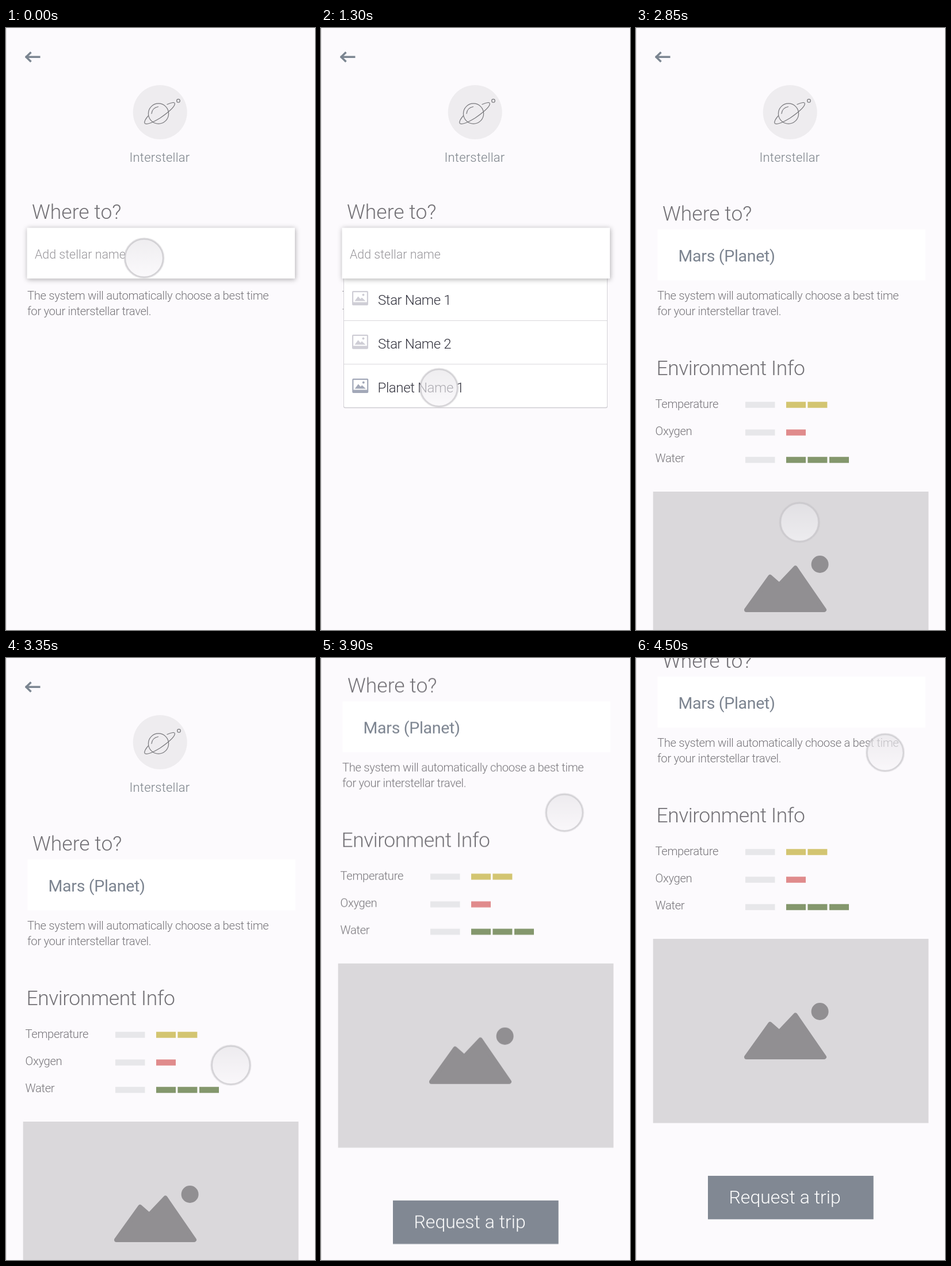
These frames come from a looping animation (537 px wide and 1044 px high, 5.05 s). An HTML page:

```html
<!DOCTYPE html>
<html lang="en">
<head>
<meta charset="utf-8">
<title>Trip form</title>
<style>
html, body { margin: 0; width: 100%; height: 100%; overflow: hidden; background: #fcfafd; }
svg { display: block; width: 537px; height: 1044px; }
text { font-family: Roboto, "Liberation Sans", sans-serif; font-weight: 300; fill: #77757a; }

.title { font-size: 35.5px; fill: #737176; }
.env { letter-spacing: -.5px; }
.body { font-size: 20.3px; letter-spacing: -.35px; }
.brand { font-size: 22px; letter-spacing: .2px; fill: #7b8289; }
.hint { font-size: 21.4px; fill: #98969b; }
.value { font-size: 28.5px; font-weight: 400; letter-spacing: -.3px; fill: #7c8490; }
.option { font-size: 24px; letter-spacing: -.4px; fill: #34343f; }
.button { font-size: 32px; fill: #fff; }
.line { fill: none; stroke: #77777b; stroke-width: 1.2; stroke-linecap: round; }
.arrow { fill: none; stroke: #7b8591; stroke-width: 3.5; }
.shadow { filter: blur(4px); }

.page, .list, .before, .after, .field, .heading, .shadow, .barb, .moon, .cx, .cy, .press {
  animation: 5.05s linear infinite;
}
.page { animation-name: scroll; }
.list { animation-name: list; }
.before { animation-name: before; }
.after { animation-name: after; }
.field, .heading { animation-name: settle; }
.shadow { animation-name: flatten; }
.barb { animation-name: barb; }
.moon { animation-name: moon; }
.cx { animation-name: cx; }
.cy { animation-name: cy; }
.press { animation-name: press; }

@keyframes scroll {
  0%, 69.31% { transform: translateY(0); animation-timing-function: cubic-bezier(.35, .08, .6, .81); }
  77.23% { transform: translateY(-274px); animation-timing-function: cubic-bezier(.1, .45, .3, 1); }
  89.11%, 100% { transform: translateY(-317px); }
}
@keyframes list {
  0%, .2% { opacity: 0; animation-timing-function: ease-out; }
  5.94%, 36.59% { opacity: 1; }
  36.6%, 100% { opacity: 0; }
}
@keyframes before {
  0%, 36.59% { opacity: 1; }
  36.6%, 100% { opacity: 0; }
}
@keyframes after {
  0%, 36.59% { opacity: 0; }
  36.6%, 100% { opacity: 1; }
}
@keyframes settle {
  0%, 36.64% { transform: translate(0, 0); animation-timing-function: ease-in-out; }
  45.54%, 100% { transform: translate(1px, 3px); }
}
@keyframes flatten {
  0%, 36.64% { opacity: 1; animation-timing-function: ease-in-out; }
  45.54%, 100% { opacity: 0; }
}
@keyframes barb {
  0%, 36.59% { transform: translateY(0); }
  36.6%, 36.64% { transform: translateY(-8px); animation-timing-function: ease-in-out; }
  45.54%, 100% { transform: translateY(0); }
}
@keyframes moon {
  0%, 36.64% { transform: translateX(0); }
  45.54%, 100% { transform: translateX(1px); }
}
@keyframes cx {
  0%, 12.18% { transform: translateX(240px); animation-timing-function: ease; }
  22.77%, 46.53% { transform: translateX(205px); animation-timing-function: cubic-bezier(.4, 0, .8, .62); }
  56.44% { transform: translateX(284px); animation-timing-function: cubic-bezier(.3, .5, .6, 1); }
  68.32%, 71.88% { transform: translateX(394px); animation-timing-function: cubic-bezier(.4, 0, .7, .8); }
  77.23% { transform: translateX(423px); animation-timing-function: cubic-bezier(.1, .57, .3, 1); }
  89.11%, 100% { transform: translateX(433px); }
}
@keyframes cy {
  0%, 12.18% { transform: translateY(399px); animation-timing-function: ease; }
  22.77%, 46.53% { transform: translateY(624px); animation-timing-function: cubic-bezier(.4, 0, .6, .9); }
  56.44% { transform: translateY(857px); animation-timing-function: cubic-bezier(.3, .25, .6, 1); }
  59.41% { transform: translateY(883px); animation-timing-function: ease-in-out; }
  68.32%, 71.88% { transform: translateY(686.5px); animation-timing-function: cubic-bezier(.4, 0, .7, .8); }
  77.23% { transform: translateY(269px); animation-timing-function: cubic-bezier(.1, .57, .3, 1); }
  89.11%, 100% { transform: translateY(164px); }
}
@keyframes press {
  0%, 23% { transform: scale(1); }
  25.7%, 33% { transform: scale(.97); }
  33.6%, 68.4% { transform: scale(1); }
  71.2%, 100% { transform: scale(.955); }
}
</style>
</head>
<body>
<svg viewBox="0 0 537 1044">
  <defs>
    <linearGradient id="glass" x2="0" y2="1">
      <stop offset="0" stop-color="#e6e4e8" stop-opacity=".66"/>
      <stop offset="1" stop-color="#f8f6f9" stop-opacity=".66"/>
    </linearGradient>
    <g id="thumb">
      <path d="M2 0H26Q28 0 28 2V23Q28 25 26 25H2Q0 25 0 23V2Q0 0 2 0ZM2.2 2.2V19.5H25.8V2.2Z" fill-rule="evenodd"/>
      <path d="M4.5 17.5L10.5 9.5 14.5 14 17 11.5 23.5 17.5Z"/>
      <circle cx="19.5" cy="6.8" r="2"/>
    </g>
  </defs>
  <rect width="537" height="1044" fill="#fcfafd"/>

  <g class="page">
    <g class="arrow">
      <path d="M33.5 50.2H59.5"/>
      <path d="M43.5 42L34.5 50.7"/>
      <path class="barb" d="M34.5 49.7L43.5 58.6"/>
    </g>

    <circle cx="267.7" cy="146" r="47" fill="#eeecef"/>
    <g class="line">
      <circle cx="265" cy="148.5" r="17.6"/>
      <path d="M253 148.5Q254 138.5 264.5 136.5"/>
      <path d="M280 132.5C287 129.5 293 128 293.3 131C294 136 281 147 268 156C255 164 243 169 241 165C240 162 243 157 247.5 152"/>
      <circle class="moon" cx="299.5" cy="126.2" r="2.8"/>
    </g>
    <text class="brand" x="214.5" y="232">Interstellar</text>

    <text class="title heading" x="45" y="330.5">Where to?</text>
    <text class="body" x="37" y="470.5">The system will automatically choose a best time</text>
    <text class="body" x="37" y="498">for your interstellar travel.</text>

    <g class="list">
      <rect x="39" y="426" width="459" height="233.3" rx="3" fill="#cfcdd2"/>
      <rect x="39.9" y="426" width="457.2" height="231.7" rx="2.5" fill="#fff"/>
      <path d="M40 507.5H497M40 583H497" stroke="#d9d7db" stroke-width="1.2"/>
      <use href="#thumb" x="54" y="456" fill="#cfced6"/>
      <use href="#thumb" x="54" y="531.7" fill="#cfced6"/>
      <use href="#thumb" x="54.3" y="608" fill="#a2a8b8"/>
      <text class="option" x="99" y="480">Star Name 1</text>
      <text class="option" x="99" y="555.5">Star Name 2</text>
      <text class="option" x="98.5" y="631.5">Planet Name 1</text>
    </g>

    <g class="field">
      <rect class="shadow" x="37" y="347.5" width="466" height="89" fill="#000" fill-opacity=".3"/>
      <rect x="36.5" y="346.5" width="465.5" height="88" fill="#fff"/>
    </g>
    <text class="hint before" x="50" y="400">Add stellar name</text>

    <g class="after">
      <text class="value" x="73.5" y="405">Mars (Planet)</text>
      <text class="title env" x="35.5" y="601.5">Environment Info</text>
      <text class="body" x="33.5" y="658.5">Temperature</text>
      <text class="body" x="33.5" y="705.5">Oxygen</text>
      <text class="body" x="33.5" y="753">Water</text>
      <path d="M190 653.5h51.5m-51.5 48h51.5m-51.5 47.5h51.5" stroke="#e7e7ea" stroke-width="10.4"/>
      <g stroke-width="10.4">
        <path d="M261 653.5h34m3.4 0h34" stroke="#d3c571"/>
        <path d="M261 701.5h34" stroke="#e08b8c"/>
        <path d="M261 749h34m3.4 0h34m3.6 0h34" stroke="#84976d"/>
      </g>
      <rect x="29.7" y="804" width="478.6" height="319.5" fill="#dad8db"/>
      <g fill="#918f92">
        <path d="M192 1009L233 952 249 966 277 936.5 327 1009Z" stroke="#918f92" stroke-width="8" stroke-linejoin="round"/>
        <circle cx="319.6" cy="930" r="15"/>
      </g>
      <rect x="125" y="1215" width="287.7" height="75.4" fill="#818893"/>
      <text class="button" x="161.5" y="1263">Request a trip</text>
    </g>
  </g>

  <path d="M.5 0V1044" stroke="#dfdde1"/>

  <g class="cx"><g class="cy"><g class="press">
    <circle r="33.5" fill="none" stroke="#bebcc0" stroke-opacity=".4" stroke-width="4"/>
    <circle r="33" fill="url(#glass)" stroke="#c9c7cb" stroke-opacity=".75" stroke-width="2"/>
  </g></g></g>
</svg>
</body>
</html>
```
